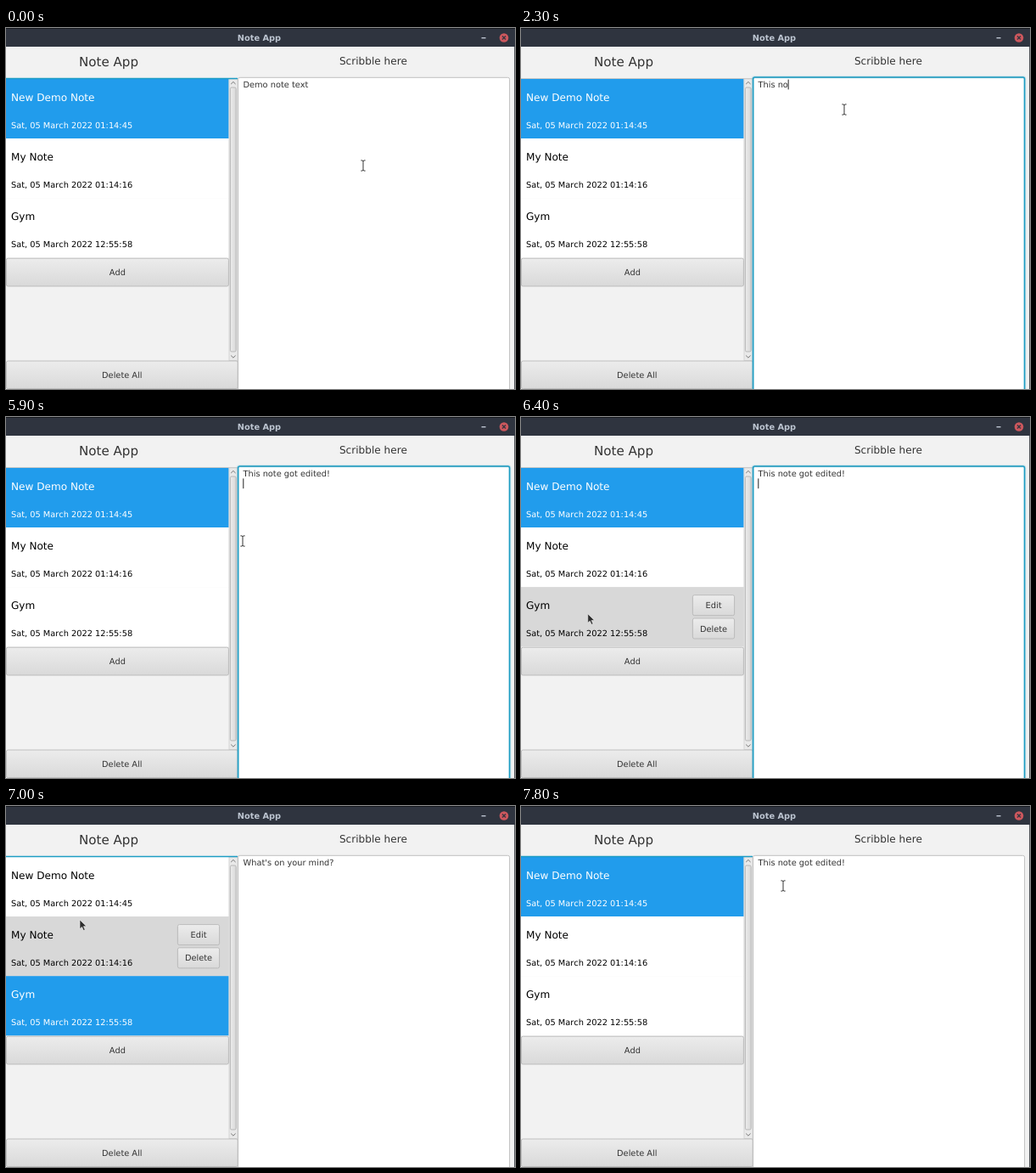
An HTML page for the animation above (8000 ms loop, 600x425 px).

```html
<!DOCTYPE html>
<html lang="en">
<head>
<meta charset="utf-8">
<title>Note App</title>
<style>
  html, body { margin: 0; width: 100%; height: 100%; overflow: hidden; background: #f2f2f2; }
  svg { display: block; width: 600px; height: 425px; }
  text {
    font: 9.81px "DejaVu Sans", sans-serif;
    font-kerning: none; font-variant-ligatures: none;
    text-rendering: geometricPrecision; white-space: pre; fill: #333;
  }
  .mid { text-anchor: middle; }
  .title { font-weight: bold; fill: #bdc5d1; }
  .h1 { font-size: 15.1px; }
  .h2, .name { font-size: 12.08px; }
  .row text { fill: #000; }
  .row .btn text { fill: #333; }
  .row .bg { fill: #fff; }
  .row .btns { visibility: hidden; }
  .row.hover .bg { fill: #d8d8d8; }
  .row.hover .btns { visibility: visible; }
  .row.selected .bg { fill: #219cec; }
  .row.selected > text { fill: #fff; }
  .btn rect { fill: url(#face); stroke: #b7b7b7; stroke-width: .9; }
  .focus { fill: none; stroke: #1d9dc4; }
</style>
</head>
<body>
<svg viewBox="0 0 600 425">
  <defs>
    <linearGradient id="face" x2="0" y2="1">
      <stop offset="0" stop-color="#f0f0f0"/>
      <stop offset=".06" stop-color="#ebebeb"/>
      <stop offset="1" stop-color="#d9d9d9"/>
    </linearGradient>
    <linearGradient id="thumb">
      <stop offset="0" stop-color="#ececec"/>
      <stop offset="1" stop-color="#d8d8d8"/>
    </linearGradient>
  </defs>

  <rect width="600" height="425" fill="#f2f2f2"/>
  <rect width="600" height="22" fill="#2f343f"/>
  <rect width="600" height="1" fill="#17191e"/>
  <text class="title mid" x="298.5" y="15">Note App</text>
  <path d="M560.5 11.7h5" stroke="#bdc5d1" stroke-width="1.4"/>
  <circle cx="587" cy="11.5" r="5.3" fill="#cc575d"/>
  <path d="M585 9.5l4 4m0-4l-4 4" stroke="#2f343f" stroke-width="1.2"/>

  <text class="h1 mid" x="121" y="44.6">Note App</text>
  <text class="h2 mid" x="433" y="43.2">Scribble here</text>

  <path d="M0 59.5H273" stroke="#c6c6c6"/>
  <g id="rows"></g>

  <rect x="263" y="60" width="10" height="331.5" fill="#e9e9e9" stroke="#cfcfcf" stroke-width=".8"/>
  <rect x="264.4" y="70" width="6.8" height="311" rx="1.6" fill="url(#thumb)" stroke="#b2b2b2" stroke-width=".9"/>
  <path d="M265.2 66l2.7-2.6 2.7 2.6M265.2 385.6l2.7 2.6 2.7-2.6" fill="none" stroke="#777"/>
  <path id="listFocus" class="focus" d="M0 59.4H273" stroke-width="1.5"/>
  <g id="buttons"></g>

  <rect x="273.6" y="58.3" width="320" height="380" rx="2" fill="#fff" stroke="#b9b9b9" stroke-width=".9"/>
  <g id="areaFocus" class="focus">
    <rect x="273.4" y="57.9" width="320.4" height="380" rx="2" stroke-width="3.4" opacity=".18"/>
    <rect x="273.6" y="58.1" width="320" height="380" rx="2" stroke-width="1.5"/>
  </g>
  <rect id="mark" x="279.5" y="60.6" height="11.6" fill="#0096c9"/>
  <text id="note" x="279.5" y="70"></text>
  <rect id="caret" width="1" height="11.8" fill="#222"/>
  <rect x="599.2" y="22" width=".8" height="403" fill="#33363c"/>

  <g id="beam" fill="none">
    <path d="M-2.6-6.1h1.6l1 .8 1-.8h1.6M-2.6 6.1h1.6l1-.8 1 .8h1.6M0-5.4V5.4" stroke="#fff" stroke-width="2" opacity=".7"/>
    <path d="M-2.6-6.1h1.6l1 .8 1-.8h1.6M-2.6 6.1h1.6l1-.8 1 .8h1.6M0-5.4V5.4" stroke="#333"/>
  </g>
  <path id="arrow" d="M0 0V10.6L2.5 8.4 4.4 12.6 6.2 11.8 4.4 7.7H7.8Z" fill="#2d2d2d" stroke="#f4f4f4" stroke-width=".6"/>
</svg>

<script>
const $ = id => document.getElementById(id);
const LOOP = 8000, STEP = 100, ROW_TOP = 60, ROW_H = 70.1;

const button = (x, y, w, h, label) =>
  `<g class="btn"><rect x="${x}" y="${y}" width="${w}" height="${h}" rx="2"/>
   <text class="mid" x="${x + w / 2}" y="${y + h / 2 + 3.6}">${label}</text></g>`;

const notes = [
  ["New Demo Note", "01:14:45"],
  ["My Note", "01:14:16"],
  ["Gym", "12:55:58"]
];
$("rows").innerHTML = notes.map(([name, clock], i) =>
  `<g class="row" transform="translate(0 ${ROW_TOP + i * ROW_H})">
     <rect class="bg" width="262.6" height="${ROW_H}"/>
     <text class="name" x="6" y="26">${name}</text>
     <text x="6" y="57.6">Sat, 05 March 2022 ${clock}</text>
     <g class="btns">${button(202.4, 9.5, 49.2, 24, "Edit")}${button(202.4, 36.8, 49.2, 24, "Delete")}</g>
   </g>`).join("");
$("buttons").innerHTML =
  button(.4, 271.2, 262, 32.8, "Add") + button(.4, 392, 272.8, 32.6, "Delete All");
const rows = [...document.querySelectorAll(".row")];

const EDITED = "This note got edited!";
// [time, characters typed so far]
const typing = [
  [1100, 0], [1600, 1], [1700, 2], [1900, 3], [2000, 4], [2100, 5], [2300, 7],
  [2600, 8], [2700, 9], [3000, 10], [3200, 11], [3300, 12], [3500, 14], [3700, 15],
  [3900, 16], [4000, 17], [4100, 18], [4300, 19], [4500, 20], [4900, 21]
];
// [time, x, y]; straight moves in between
const pointer = [
  [0, 421, 162], [100, 419, 162], [400, 419, 162], [700, 381, 96], [5800, 381, 96],
  [5900, 279, 146], [6100, 165, 204], [6500, 50, 241], [6700, 50, 241],
  [6800, 56, 222], [7000, 87, 134], [7200, 106, 96], [7300, 106, 96],
  [7600, 238, 94], [7700, 292, 94], [7800, 309, 94], [LOOP, 309, 94]
];

function pointerAt(t) {
  const i = pointer.findIndex(p => p[0] > t);
  const [t0, x0, y0] = pointer[i - 1], [t1, x1, y1] = pointer[i];
  const k = (t - t0) / (t1 - t0);
  return [x0 + (x1 - x0) * k, y0 + (y1 - y0) * k];
}

function noteAt(t) {
  if (t < 1100) return "Demo note text";
  if (t >= 6700 && t < 7300) return "What's on your mind?";
  const typed = typing.filter(k => k[0] <= t).pop()[1];
  return EDITED.slice(0, typed);
}

const show = (id, on) => $(id).setAttribute("visibility", on ? "visible" : "hidden");
const place = (id, x, y) => $(id).setAttribute("transform", `translate(${x} ${y})`);

function draw(t) {
  const [x, y] = pointerAt(t);
  const focused = t >= 100 && t < 6600;
  const marked = t >= 800 && t < 1100;
  const newLine = t >= 5300;
  const inList = x < 263;
  const chosen = t >= 6700 && t < 7300 ? 2 : 0;
  const over = inList ? Math.floor((y - ROW_TOP) / ROW_H) : -1;

  rows.forEach((row, i) => {
    row.classList.toggle("selected", i === chosen);
    row.classList.toggle("hover", i === over);
  });
  show("areaFocus", focused);
  show("listFocus", !focused);

  const note = $("note");
  note.textContent = noteAt(t);
  note.style.fill = marked ? "#fff" : "";
  const width = note.textContent ? note.getComputedTextLength() : 0;
  $("mark").setAttribute("width", width);
  show("mark", marked);
  show("caret", focused && !(t >= 5300 && t < 5500));
  place("caret", 279.3 + (newLine ? 0 : width), newLine ? 72.4 : 60.6);

  show("arrow", inList);
  show("beam", !inList);
  place(inList ? "arrow" : "beam", x, y);
}

const start = performance.now();
let last = -1;
function tick() {
  const t = Math.floor(((performance.now() - start) % LOOP) / STEP) * STEP;
  if (t !== last) draw(last = t);
  requestAnimationFrame(tick);
}
tick();
</script>
</body>
</html>
```
